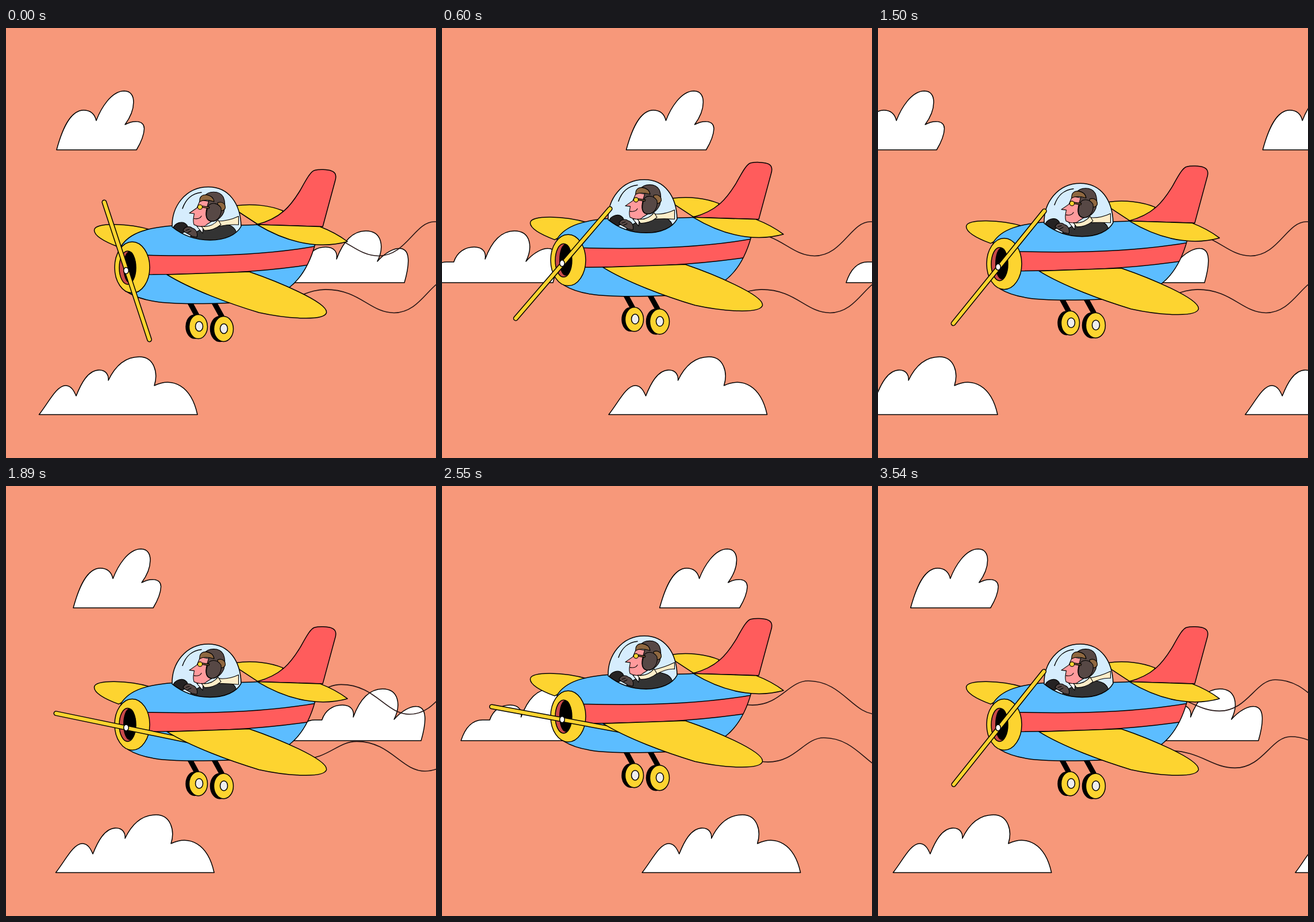
Recreate the animation shown at these times as an HTML page. Size 748 by 748 pixels, loop 3.6 s.

```html
<!DOCTYPE html>
<html lang="en">
<head>
<meta charset="utf-8">
<title>Little plane</title>
<style>
  html, body { margin: 0; width: 100%; height: 100%; overflow: hidden; background: #f7987a; }
  svg { display: block; width: 100vw; height: 100vh; }
  .ink { stroke: #000; stroke-width: 1.5; stroke-linejoin: round; stroke-linecap: round; }
  .thin { stroke: #000; stroke-width: 1.1; stroke-linejoin: round; stroke-linecap: round; }
  .line { fill: none; }
  .yellow { fill: #fdd430; }
  .red { fill: #ff5c5c; }
  .blue { fill: #5cbdff; }
  .white { fill: #fff; }
  .hub { fill: #eee; }
  .dark { fill: #333; }
  .leather { fill: #574845; }
  .tan { fill: #8f6840; }
  .skin { fill: #ff9a9c; }
  .cream { fill: #fdedc8; }
  .rope { fill: none; stroke: #241414; stroke-width: 1.6; }
</style>
</head>
<body>
<svg viewBox="0 0 748 748">
  <defs>
    <clipPath id="ropeClip"><rect x="513" y="0" width="240" height="748"/></clipPath>
    <path id="domeShape" d="M289 346C288 311 312 276.500 352 276.500C388 276.500 408 306 409 345C401 360 381 369 355 369C328 369 305 359 289 346Z"/>
    <path id="bodyShape" d="M200 380C215 355 250 347 290 344L340 343C375 342 410 344.500 437 342L537.500 377C528 411 513 436 492 452L440 474C410 478 370 479.500 325 479.500C275 479.500 238 476 212 460Z"/>
    <clipPath id="domeClip"><use href="#domeShape"/></clipPath>
    <clipPath id="bodyClip"><use href="#bodyShape"/></clipPath>
    <g id="clouds" class="ink white">
      <path d="M88 212C98 175 112 143 135 143C150 143 155 153 157 161C165 140 183 109.500 206 109.500C228 110 226 142 207 168C222 160 240 160 240.500 175C240 188 233 202 227 212Z"/>
      <path d="M470.500 443C478 420 490 407 508 407L520.500 407C526 390 540 381 556 381C572 381 577 391 575 402C585 375 600 353 626 353C655 353 658 382 646 406C660 390 675 383 685 383.500C703 384 703 408 693 443Z"/>
      <path d="M57.500 672.500C75 650 88 622 104 622C114 622 119 633 122 640C130 620 142 595 162 595C175 595 179 605 178 613C188 592 205 572 232 572C258 572 265 600 258 622C290 607 322 622 333 672.500Z"/>
    </g>
  </defs>

  <rect width="748" height="748" fill="#f7987a"/>
  <use id="cloudsA" href="#clouds"/>
  <use id="cloudsB" href="#clouds"/>
  <g clip-path="url(#ropeClip)">
    <g transform="translate(-27 -99)"><path id="ropeTop" class="rope"/></g>
    <path id="ropeLow" class="rope"/>
  </g>

  <g id="plane">
    <!-- far wing, far tailplane and fin -->
    <path class="ink yellow" d="M252 351C215 340 153 337 153.500 352C154 364 180 375 196 381Z"/>
    <path class="ink yellow" d="M400 309C430 305 460 309 482 318L470 341L437 341L405 320Z"/>
    <path class="ink red" d="M436 342C478 331 495 310 512 282C522 264 530 249 537 247.500C545 245.500 559 246 566 248.500C574 251 575 258 572.500 266L551 345.500Z"/>

    <!-- landing gear -->
    <path class="line" stroke="#000" stroke-width="9" d="M319 476L332 500M360 474L376 503"/>
    <ellipse class="ink" cx="328" cy="519.500" rx="15" ry="20.500"/>
    <ellipse class="ink yellow" cx="334.500" cy="519.500" rx="16" ry="21"/>
    <ellipse class="ink hub" cx="336" cy="519" rx="6.500" ry="8.500"/>
    <ellipse class="ink" cx="372" cy="523.500" rx="16.500" ry="22"/>
    <ellipse class="ink yellow" cx="378.500" cy="523.500" rx="17" ry="22"/>
    <ellipse class="ink hub" cx="379" cy="523" rx="6.500" ry="8.500"/>

    <!-- fuselage -->
    <use href="#bodyShape" class="blue"/>
    <path class="ink red" clip-path="url(#bodyClip)" d="M240 395C340 398 450 396 545 378.500L540 410C440 426 350 428 240 429Z"/>
    <use href="#bodyShape" class="ink line"/>
    <path class="ink yellow" d="M437 342L546 345.500C563 352 580 361 594 371.500C560 381 505 383 437 342Z"/>

    <!-- cockpit -->
    <use href="#domeShape" fill="#d6edfd"/>
    <g clip-path="url(#domeClip)">
      <path class="thin dark" d="M318 366C328 353 338 353 345 346L373 340C390 341 399 346 401 357L395 372L318 372Z"/>
      <path class="thin white" d="M332 345L343 344L342 357Z"/>
      <path id="scarf" class="thin cream"/>
      <path class="thin skin" d="M338 299L332 313L319 322L327.500 323C326 331 325 336 327 342C334 346 345 347 349 342L360 335L360 303Z"/>
      <path class="thin cream" d="M340 345C352 347 362 342 369 334L374 342C366 349 354 353 345 352Z"/>
      <path class="thin line" d="M327 331.500C333 332.500 338 331 340 327"/>
      <path class="thin leather" d="M345 293C351 283 371 282 378 294C382 303 381 312 379 320C375 330 365 338 355 336C346 333 347 322 349.500 312L353 300Z"/>
      <path class="thin tan" d="M337 302C336 294 341 290 348 290C355 291 361 294 362 302C352 299 343 299 337 302Z"/>
      <path class="thin tan" d="M368 304C375 301 382 305 381.500 313C379 319 373 319 369 315Z"/>
      <path class="thin leather" d="M353 308C360 302 370 306 374 313C376 326 368 337 357 336C346 334 347 321 353 308Z"/>
      <path class="thin tan" d="M341 309.500L354 311.500L353 314L341 312Z"/>
      <circle class="thin yellow" cx="337.500" cy="311.500" r="4"/>
      <path class="thin" fill="#252222" d="M290 350C293 338 308 334 315 343L318 351L306 357Z"/>
      <path class="thin leather" d="M308 352C311 345 319 344 324 348C331 350 334 357 332 364L323 362C319 358 313 358 308 352ZM313 352L319 350M316 356L322 353"/>
    </g>
    <path class="ink line" d="M307 314C313 297 323 288 340 286"/>
    <use href="#domeShape" class="ink line"/>

    <!-- engine and propeller -->
    <ellipse class="ink yellow" cx="219.500" cy="416.500" rx="30.500" ry="44.500"/>
    <ellipse class="ink" fill="#c94a4a" cx="211.500" cy="417" rx="14.500" ry="29"/>
    <ellipse cx="215" cy="416" rx="11" ry="27.500"/>
    <rect id="prop" class="ink yellow" x="-3.700" y="-129.500" width="7.400" height="259" rx="3.700"/>
    <ellipse class="ink white" cx="209" cy="422" rx="4.300" ry="5.500"/>

    <path class="ink yellow" d="M280 429L423 424C470 440 560 477 557.500 495C554 510 490 506 440 495C390 480 322 455 280 429Z"/>
  </g>
</svg>
<script>
  const $ = id => document.getElementById(id);
  const STEP = 75, TICK = 30, LOOP_STEPS = 24;
  const set = (id, name, value) => $(id).setAttribute(name, value);
  const move = (id, x, y) => set(id, 'transform', `translate(${x} ${y})`);
  const sq = v => v * v;

  // Height of the rope's crests and troughs, swelling away from the plane.
  const crestY = x => Math.min(460, 436 + 0.00073 * sq(Math.max(0, 717 - x)));
  const troughY = x => Math.max(475, 496 - 0.0009 * sq(Math.max(0, 700 - x)));

  function ropePath(phase) {
    const points = [];
    for (let k = -2; k < 3; k++) {
      const crest = 556 + 216 * (k + phase), trough = crest + 119;
      points.push([crest, crestY(crest)], [trough, troughY(trough)]);
    }
    return points.map(([x, y], i) => {
      if (!i) return `M${x} ${y}`;
      const [px, py] = points[i - 1], span = x - px;
      return `C${px + span * 0.5} ${py} ${x - span * 0.35} ${y} ${x} ${y}`;
    }).join('');
  }

  function scarfPath(n) {
    const swing = Math.cos((n - 1.25) * Math.PI / 3);
    const top = 326.5 + 3.7 * swing, low = 340.5 + 6.5 * swing;
    return `M366 336Q386 ${top + 9} 404.500 ${top}L404.500 ${low}Q388 ${low - 1} 370 345Z`;
  }

  function draw(ms) {
    const step = Math.floor(Math.floor(ms / TICK) * TICK / STEP);
    const n = step % LOOP_STEPS, u = n / LOOP_STEPS;
    move('cloudsA', 697.5 * u, 0);
    move('cloudsB', 750 * (u - 1), 0);
    move('plane', 0, -19 * (1 - Math.abs(1 - 2 * u)));
    set('prop', 'transform', `translate(210.200 422.500) rotate(${-18.2 + 119.86 * n})`);
    set('scarf', 'd', scarfPath(n));
    const rope = ropePath((n % 4) / 4);
    set('ropeTop', 'd', rope);
    set('ropeLow', 'd', rope);
  }

  const start = performance.now();
  function tick() {
    draw((performance.now() - start) % 3600);
    requestAnimationFrame(tick);
  }
  tick();
</script>
</body>
</html>
```
